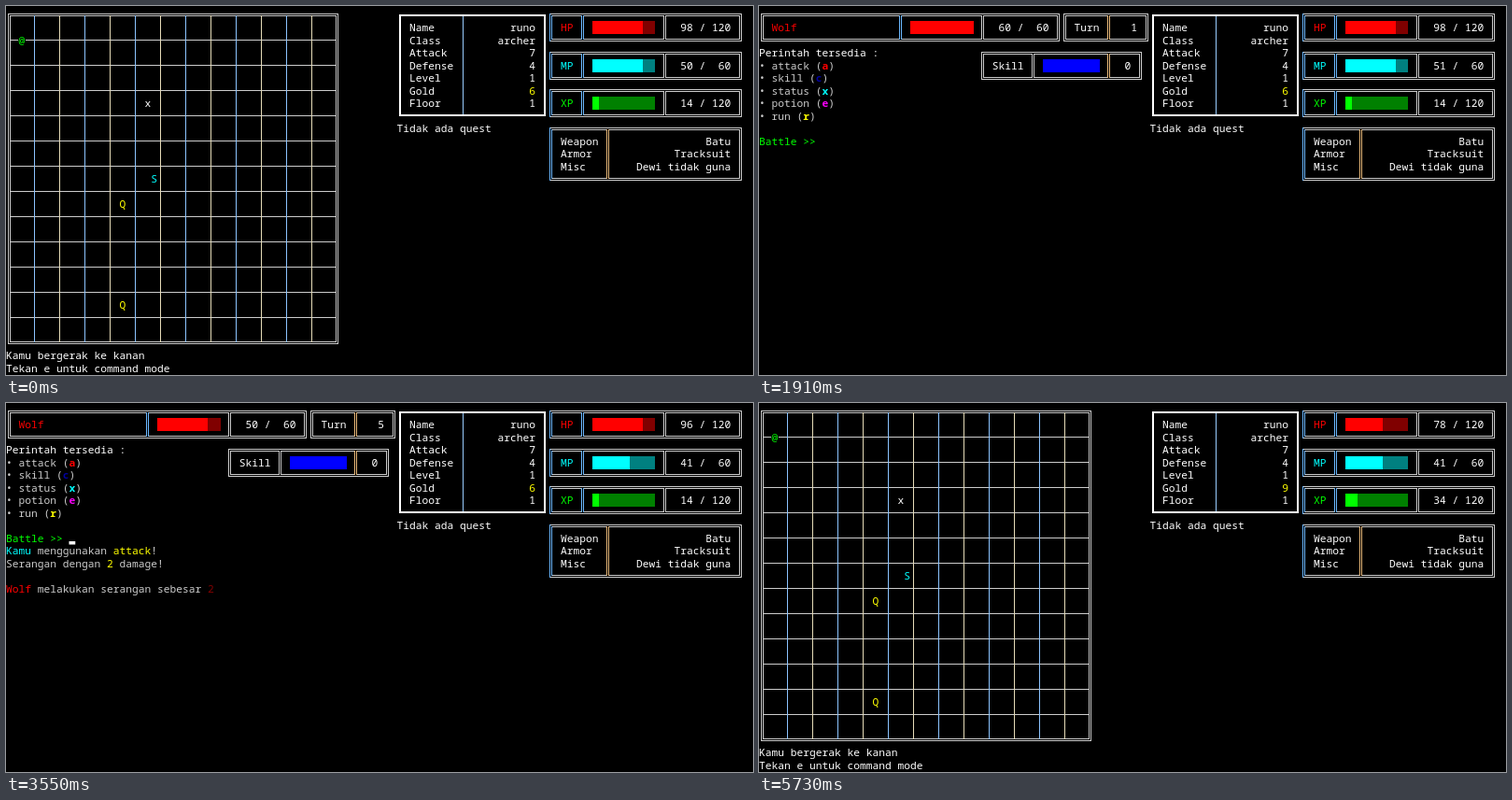
Animation of 800 by 395 pixels, one loop 5910 ms. Source, as an HTML page with a canvas:

```html
<!DOCTYPE html>
<html lang="id">
<head>
<meta charset="utf-8">
<title>Terminal RPG</title>
<style>
html, body { margin: 0; width: 100%; height: 100%; overflow: hidden; background: #000; }
canvas { display: block; }
</style>
</head>
<body>
<canvas id="term" width="800" height="395"></canvas>
<script>
const ctx = document.getElementById('term').getContext('2d');
const LOOP = 5910, CW = 6.75, RH = 13.5;
const FONT = '11.25px "Noto Sans Mono", "DejaVu Sans Mono", monospace';
const GREY = '#ccc', BLUE = '#6bb8ff', TAN = '#e8b878';
const INK = {
  w: '#fff', l: GREY, r: '#f00', d: '#800000', c: '#0ff',
  g: '#0f0', y: '#ff0', b: '#0000a0', m: '#f0f'
};
const TINT = { 22: BLUE, 86: BLUE, 91: BLUE, 55: TAN, 95: TAN };

const midX = col => Math.floor(col * CW + CW / 2);
const midY = row => Math.floor(23.3 + row * RH);

function rect(x, y, w, h, color) {
  ctx.fillStyle = color;
  ctx.fillRect(x, y, w, h);
}

// "^x" switches the ink, "^X" switches to bold as well.
function print(col, row, text, ink = 'w') {
  const y = Math.round(27.4 + row * RH);
  const setInk = k => {
    const low = k.toLowerCase();
    ctx.fillStyle = INK[low];
    ctx.font = (k === low ? '' : 'bold ') + FONT;
  };
  setInk(ink);
  for (let i = 0; i < text.length; i++) {
    if (text[i] === '^') { setInk(text[++i]); continue; }
    if (text[i] !== ' ') ctx.fillText(text[i], col * CW, y);
    col++;
  }
}

function printRight(end, row, text, ink) {
  text = String(text);
  print(end - text.length, row, text, ink);
}

function frame(x0, y0, x1, y1, color) {
  rect(x0, y0, x1 - x0 + 1, 1, color);
  rect(x0, y1, x1 - x0 + 1, 1, color);
  rect(x0, y0, 1, y1 - y0 + 1, color);
  rect(x1, y0, 1, y1 - y0 + 1, color);
}

// Double-line box; cols holds the left edge, the dividers and the right edge.
function box(cols, top, bottom) {
  const xs = cols.map(midX), y0 = midY(top), y1 = midY(bottom), last = xs.length - 1;
  frame(xs[0] - 1, y0 - 1, xs[last] + 1, y1 + 1, GREY);
  for (let i = 0; i < last; i++) frame(xs[i] + 1, y0 + 1, xs[i + 1] - 1, y1 - 1, GREY);
  cols.forEach((col, i) => {
    if (!TINT[col]) return;
    const out = i === 0 ? -1 : 1;
    rect(xs[i] - 1, y0 + out, 1, y1 - y0 + 1 - 2 * out, TINT[col]);
    rect(xs[i] + 1, y0 + 1, 1, y1 - y0 - 1, TINT[col]);
  });
}

function bar(col, row, cells, full, on, off) {
  const x0 = Math.round(col * CW), y = Math.round(16.4 + row * RH);
  const x1 = Math.round((col + full) * CW), x2 = Math.round((col + cells) * CW);
  rect(x0, y, x2 - x0, 14, off);
  rect(x0, y, x1 - x0, 14, on);
}

const ratio = (now, max) => String(now).padStart(2) + ' / ' + String(max).padStart(3);
const tenths = (now, max) => Math.floor(now / max * 10);

function gauge(row, label, ink, now, max, dark) {
  box([86, 91, 104, 116], row - 1, row + 1);
  print(88, row, label, ink);
  bar(93, row, 10, tenths(now, max), INK[ink], dark);
  print(107, row, ratio(now, max));
}

function sidebar(s) {
  const x0 = midX(62), x1 = midX(85), y0 = midY(-1), y1 = midY(7);
  frame(x0, y0, x1, y1, '#fff');
  frame(x0 + 1, y0 + 1, x1 - 1, y1 - 1, '#fff');
  rect(midX(72), y0 + 2, 1, y1 - y0 - 3, '#9cf');
  const stats = [['Name', 'runo'], ['Class', 'archer'], ['Attack', 7], ['Defense', 4],
    ['Level', 1], ['Gold', s.gold], ['Floor', 1]];
  stats.forEach(([key, value], row) => {
    print(64, row, key);
    printRight(84, row, value, key === 'Gold' ? 'y' : 'w');
  });
  print(62, 8, 'Tidak ada quest');

  gauge(0, 'HP', 'r', s.hp, 120, '#800000');
  gauge(3, 'MP', 'c', s.mp, 60, '#008080');
  gauge(6, 'XP', 'g', s.xp, 120, '#008000');

  box([86, 95, 116], 8, 12);
  const gear = [['Weapon', 'Batu'], ['Armor', 'Tracksuit'], ['Misc', 'Dewi tidak guna']];
  gear.forEach(([key, value], i) => {
    print(88, 9 + i, key);
    printRight(115, 9 + i, value);
  });
}

function drawMap() {
  const x0 = midX(0), x1 = midX(52), y0 = midY(-1), y1 = midY(25);
  box([0, 52], -1, 25);
  for (let row = 1; row < 25; row += 2) rect(x0 + 1, midY(row), x1 - x0 - 1, 1, GREY);
  for (let k = 1; k < 13; k++) {
    rect(midX(4 * k), y0 + 1, 1, y1 - y0 - 1, k % 2 ? '#8cc4ff' : '#e6dcb8');
  }
  rect(13, 30, 8, 13, '#000');
  print(2, 1, '@', 'g');
  print(22, 6, 'x');
  print(23, 12, 'S', 'c');
  print(18, 14, 'Q', 'y');
  print(18, 22, 'Q', 'y');
  print(0, 26, 'Kamu bergerak ke kanan');
  print(0, 27, 'Tekan e untuk command mode');
}

function drawEnemy(s) {
  box([0, 22, 35, 47], -1, 1);
  print(2, 0, 'Wolf', 'r');
  bar(24, 0, 10, tenths(s.wolf, 60), '#f00', '#800000');
  print(38, 0, ratio(s.wolf, 60));
  print(0, 9, 'Battle >>', 'g');
}

function lines(row, list) {
  list.forEach((text, i) => print(0, row + i, text, 'l'));
}

function drawMeet() {
  lines(2, ['^cKamu^l ketemu ^rWolf^l !!!', 'Apa yang akan ^ckamu^l lakukan?',
    '• fight (^Rf^l)', '• status (^Cx^l)', '• run (^Yr^l)', 'Tuliskan inisial dari command']);
}

function drawFight(s) {
  box([48, 55, 61], -1, 1);
  print(50, 0, 'Turn');
  printRight(60, 0, s.turn);
  box([35, 43, 55, 60], 2, 4);
  print(37, 3, 'Skill');
  bar(45, 3, 9, 9 - 3 * s.wait, '#00f', '#000080');
  printRight(59, 3, s.wait);
  lines(2, ['^wPerintah tersedia :', '• attack (^Ra^l)', '• skill (^Bc^l)',
    '• status (^Cx^l)', '• potion (^Me^l)', '• run (^Yr^l)']);
  lines(10, s.log);
}

const use = name => `^cKamu^l menggunakan ^y${name}^l!`;
const hit = n => `Serangan dengan ^y${n}^l damage!`;
const crit = n => `^yCritical Hit!^l dengan ^y${n}^l damage!`;
const bite = n => `^rWolf^l melakukan serangan sebesar ^d${n}`;
const round = (result, damage) => [use('attack'), result, '', bite(damage)];

// Each step changes only what it names.
const steps = [
  [0, { scene: 'map', hp: 98, mp: 50, xp: 14, gold: 6, wolf: 60, turn: 1, wait: 0, log: [] }],
  [1180, { scene: 'meet', mp: 51 }],
  [1910, { scene: 'fight' }],
  [2090, { turn: 2, wolf: 59, log: round(hit(1), 0) }],
  [2550, { turn: 3, wolf: 55, mp: 41, wait: 2,
    log: [use('rapid fire'), '^rMiss!', hit(4), '', bite(0)] }],
  [3090, { turn: 4, wolf: 52, wait: 1, log: round(hit(3), 0) }],
  [3360, { turn: 5, wolf: 50, wait: 0, hp: 96, log: round(hit(2), 2) }],
  [3730, { turn: 6, hp: 89, log: round('^rMiss!', 7) }],
  [4000, { turn: 7, wolf: 46, log: round(hit(4), 0) }],
  [4180, { turn: 8, wolf: 10, hp: 83, log: round(crit(36), 6) }],
  [4450, { turn: 9, wolf: 7, log: round(hit(3), 0) }],
  [4820, { turn: 10, wolf: 3, hp: 78, log: round(hit(4), 5) }],
  [5180, { wolf: 0, won: true, log: [use('attack'), crit(39), '^rWolf^l telah kalah!',
    '', '', '', '', '', '^cKamu^l dapat ^g20 XP^l!', '^cKamu^l dapat ^y3 Gold^l!',
    '', 'Tekan sembarang tombol mengakhiri battle'] }],
  [5730, { scene: 'map', xp: 34, gold: 9 }]
];
const blinks = [270, 910, 1180, 1360, 1450, 1910, 2450, 3000, 3550, 4090, 4180, 4640, 4820, 5730];

function drawCursor(s, t) {
  if (blinks.filter(b => b <= t).length % 2 === 0) return;
  if (s.scene === 'map') rect(547, 394, 7, 1, '#fff');
  else if (s.won) rect(0, 323, 7, 3.5, '#fff');
  else rect(67.5, 148, 6.75, 3.5, '#fff');
}

function draw(t) {
  const s = Object.assign({}, ...steps.filter(([at]) => at <= t).map(step => step[1]));
  rect(0, 0, 800, 395, '#000');
  sidebar(s);
  if (s.scene === 'map') drawMap();
  else {
    drawEnemy(s);
    if (s.scene === 'meet') drawMeet();
    else drawFight(s);
  }
  drawCursor(s, t);
}

const start = performance.now();
function tick() {
  draw((performance.now() - start) % LOOP);
  requestAnimationFrame(tick);
}
tick();
</script>
</body>
</html>
```
